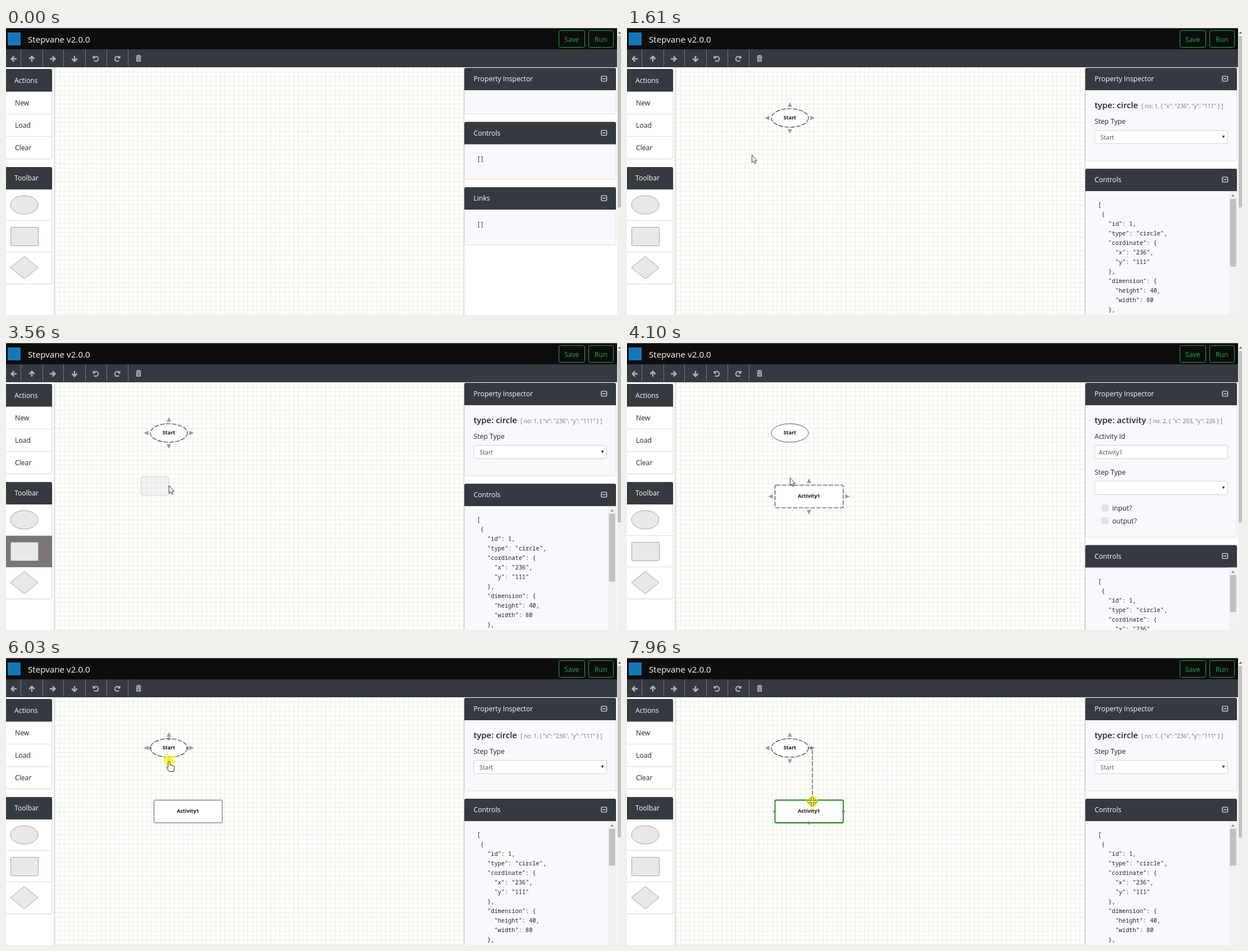
Animation, 1095 px wide and 512 px high, one loop 8 s. Source, as an HTML page:

```html
<!DOCTYPE html>
<html lang="en">
<head>
<meta charset="utf-8">
<title>Diagram editor</title>
<style>
html, body { margin: 0; width: 100%; height: 100%; overflow: hidden; background: #fff; }
svg { display: block; width: 1095px; height: 512px; }
text { font: 12.2px "Open Sans", "Noto Sans", sans-serif; fill: #212529; white-space: pre; }
.head { fill: #343a40; }
.light { fill: #fff; }
.body { fill: #f8f9fc; stroke: #d9dcdf; }
.card { fill: #fff; stroke: #cfd2d5; }
.rule { stroke: #dcdfe1; }
.field { fill: #fff; stroke: #ced4da; }
.value { font-size: 10.9px; fill: #495057; }
.kind { font-size: 14.9px; font-weight: 600; }
.info { font-size: 10px; font-weight: 500; fill: #6c757d; }
.code { font: 10.3px "Noto Sans Mono", "DejaVu Sans Mono", monospace; }
.label { font-size: 9px; font-weight: 700; text-anchor: middle; fill: #111; }
.tool { fill: #e8e8e8; stroke: #a3a3a3; }
.icon { fill: none; stroke: #b0b3b6; stroke-width: 2.5; }
.button { fill: none; stroke: #28a745; }
.green { fill: #28a745; }
.box { fill: none; stroke: #fff; stroke-width: 1.2; }
.grip { fill: #9a9a9a; }
.dot { fill: #848484; }
.shape { fill: #fff; stroke: #555; stroke-width: 1; }
.sel .shape { stroke: #333; stroke-width: 1.15; stroke-dasharray: 8 2.4; }
.hot:not(.sel) .shape { stroke: #128212; stroke-width: 1.8; }
.node .grip, .node .dot { display: none; }
.sel .grip, .hot .dot { display: inline; }
</style>
</head>
<body>
<svg viewBox="0 0 1095 512">
  <defs>
    <pattern id="grid" x="87" y="70" width="8.17" height="8.17" patternUnits="userSpaceOnUse">
      <path d="M.5 0V8.17M0 .5H8.17" stroke="#e7eedd"/>
    </pattern>
    <ellipse id="tool0" class="tool" cx="32.5" cy="315.5" rx="24.5" ry="16.5"/>
    <rect id="tool1" class="tool" x="8.5" y="355.5" width="49" height="33" rx="2"/>
    <path id="tool2" class="tool" d="M32.5 407.5L57 427.5 32.5 447.5 8 427.5Z"/>
    <path id="arrow" class="icon" d="M5 0H-4M.3 -4.7L-4.4 0 .3 4.7"/>
    <path id="turn" class="icon" style="stroke-width:2" d="M-3.6 -2.4A4.3 4.3 0 1 1 -3.2 3M-4.6 -5V-1.4H-1"/>
    <g id="fold"><rect class="box" x="1060" y="-4.5" width="9.5" height="9" rx="1.5"/><path class="box" d="M1062 0H1067.5"/></g>
    <clipPath id="codeClip"><rect x="816" y="40" width="256" height="400"/></clipPath>
  </defs>

  <rect width="1095" height="512" fill="#fff"/>
  <rect x="86" y="70" width="729" height="442" fill="url(#grid)"/>
  <path d="M86 70V512M815.5 70V512" stroke="#d3dade" stroke-width="1.5"/>

  <rect width="1088" height="38" fill="#0d0d0d"/>
  <path d="M0 .5H1088" stroke="#5a5a5a"/>
  <rect class="head" y="38" width="1088" height="32"/>
  <rect x="3" y="8" width="23" height="23" fill="#1478b8"/>
  <text class="light" x="39" y="25.5" style="font-size:15.2px">Stepvane v2.0.0</text>
  <rect class="button" x="984.5" y="4.5" width="46" height="30" rx="3"/>
  <rect class="button" x="1037.5" y="4.5" width="44" height="30" rx="3"/>
  <text class="green" x="994" y="24.5">Save</text>
  <text class="green" x="1048" y="24.5">Run</text>
  <path d="M26.5 38V69M65.5 38V69M102.5 38V69M141.5 38V69M179.5 38V69M217.5 38V69" stroke="#747a80"/>
  <use href="#arrow" transform="translate(14 55)"/>
  <use href="#arrow" transform="translate(46 55) rotate(90)"/>
  <use href="#arrow" transform="translate(83 55) rotate(180)"/>
  <use href="#arrow" transform="translate(122 55) rotate(270)"/>
  <use href="#turn" transform="translate(160 55)"/>
  <use href="#turn" transform="translate(198 55) scale(-1 1)"/>
  <path d="M231 50.5H241M234 50V49H238V50" fill="none" stroke="#b0b3b6" stroke-width="1.4"/>
  <path d="M232 52H240V60H232Z" fill="#b0b3b6"/>
  <path d="M234.4 53.5V58.5M236 53.5V58.5M237.6 53.5V58.5" stroke="#343a40" stroke-width=".7"/>

  <rect class="card" x="-2" y="73.5" width="84" height="160" rx="3"/>
  <path class="head" d="M0 73H79Q82 73 82 76V113.5H0Z"/>
  <path class="rule" d="M0 153.5H81.5M0 193.5H81.5"/>
  <text class="light" x="15" y="98">Actions</text>
  <text x="16" y="138">New</text>
  <text x="16" y="178">Load</text>
  <text x="16" y="218">Clear</text>
  <rect class="card" x="-2" y="248.5" width="84" height="208" rx="3"/>
  <path class="head" d="M0 248H79Q82 248 82 251V288H0Z"/>
  <text class="light" x="15" y="272">Toolbar</text>
  <path class="rule" d="M0 343.5H81.5M0 399.5H81.5"/>
  <rect id="row" width="82" height="56" fill="#7b7675"/>
  <use href="#tool0"/><use href="#tool1"/><use href="#tool2"/>

  <g id="side"></g>
  <rect x="1088" width="7" height="512" fill="#f1f1f1"/>
  <rect x="1089" y="14" width="6" height="306" fill="#c1c1c1"/>
  <path d="M1089.5 10L1092.5 6.5 1095 10Z" fill="#606060"/>

  <g id="circle" class="node">
    <ellipse class="shape" cx="290" cy="160.5" rx="33" ry="16.5"/>
    <text class="label" x="290" y="163">Start</text>
  </g>
  <g id="activity" class="node">
    <rect class="shape" x="263.5" y="253.5" width="121.5" height="40.5" rx="2"/>
    <text class="label" x="324" y="276">Activity1</text>
  </g>
  <path id="link" fill="none" stroke="#444" stroke-width="1.2" stroke-dasharray="8 2.4"/>
  <use id="ghost" opacity=".5"/>
  <g id="cursor">
    <circle id="glow" r="10" fill="#ffff1e" opacity=".8"/>
    <path id="point" fill="#fff" stroke="#222" stroke-width=".9" d="M.5 .5V14.2L3.4 11.4 5.5 16 7.5 15.1 5.5 10.6H9.6Z"/>
    <path id="hand" fill="#fff" stroke="#222" d="M-1.8 2.5Q0 .2 1.6 2.5V8L8 9.5Q9.7 10 9.3 12.5L8 19.5H0L-4.6 13Q-4.6 10 -1.8 12Z"/>
    <path id="move" fill="#fff" fill-opacity=".35" stroke="#55500f" stroke-width=".9"
      d="M0 -9L3.6 -5.4H1.6V-1.6H5.4V-3.6L9 0 5.4 3.6V1.6H1.6V5.4H3.6L0 9 -3.6 5.4H-1.6V1.6H-5.4V3.6L-9 0 -5.4 -3.6V-1.6H-1.6V-5.4H-3.6Z"/>
  </g>
</svg>
<script>
const $ = id => document.getElementById(id);
const show = (el, on) => { el.style.display = on ? '' : 'none'; };
const text = (x, y, s, cls = '') => `<text class="${cls}" x="${x}" y="${y}">${s}</text>`;

// Small triangles around a node, and the connection dots on its outline.
function decorate(id, cx, cy, rx, ry) {
  let out = '';
  [0, 90, 180, 270].forEach(a => {
    const c = Math.round(Math.cos(a * Math.PI / 180)), s = Math.round(Math.sin(a * Math.PI / 180));
    out += `<path class="grip" transform="translate(${cx + c * (rx + 7.5)} ${cy + s * (ry + 7.5)}) rotate(${a})" d="M-4 -4L4 0 -4 4Z"/>`;
    out += `<circle class="dot" cx="${cx + c * rx}" cy="${cy + s * ry}" r="2.5"/>`;
  });
  $(id).insertAdjacentHTML('beforeend', out);
}
decorate('circle', 290, 160.5, 33, 16.5);
decorate('activity', 324, 273.7, 61, 20.5);

function card(title, top, bottom) {
  return `<rect class="body" x="816.5" y="${top + .5}" width="269.5" height="${bottom - top - 1}" rx="3"/>
    <path class="head" d="M816 ${top + 40}V${top + 3}Q816 ${top} 819 ${top}H1083Q1086 ${top} 1086 ${top + 3}V${top + 40}Z"/>
    <use href="#fold" y="${top + 19.5}"/>` + text(832.5, top + 24.3, title, 'light');
}
const field = (y, s, x) => `<rect class="field" x="833" y="${y + .5}" width="236.5" height="24" rx="2.5"/>` + text(x, y + 17, s, 'value');
const select = (y, s) => field(y, s, 843) + `<path d="M1059.5 ${y + 10}H1064.5L1062 ${y + 14.5}Z" fill="#333"/>`;
const check = (y, s) => `<rect x="845" y="${y - 6}" width="12.5" height="12.5" rx="2.5" fill="#dee2e6"/>` + text(864, y + 4.5, s);
const heading = (kind, x, info) => text(832.5, 143.3, 'type: ' + kind, 'kind') + text(x, 143.3, info, 'info');

const json = ['[', ' {', '   "id": 1,', '   "type": "circle",', '   "cordinate": {', '     "x": "236",', '     "y": "111"',
  '   },', '   "dimension": {', '     "height": 40,', '     "width": 80', '   },'];
const controls = top => `<g transform="translate(0 ${top})">` + card('Controls', 0, 400) +
  '<g clip-path="url(#codeClip)">' + json.map((s, i) => text(838.5, 68.4 + i * 16.95, s, 'code')).join('') + `</g>
  <rect x="1072" y="40" width="13.5" height="400" fill="#f1f1f1"/>
  <path d="M1076 49.5L1079 46 1082 49.5Z" fill="#808080"/>
  <rect class="thumb" x="1073.5" y="53.5" width="11" height="66" fill="#c1c1c1"/></g>`;

const views = {
  none: card('Property Inspector', 71, 154) + card('Controls', 167.5, 270.5) + text(838.5, 237, '[]', 'code') +
    card('Links', 284, 387.5) + text(838.5, 353.5, '[]', 'code'),
  circle: card('Property Inspector', 71, 237.5) + heading('circle', 916, '[ no: 1, { "x": "236", "y": "111" } ]') +
    text(832.5, 171, 'Step Type') + select(182, 'Start') + controls(251),
  activity: card('Property Inspector', 71, 347) + heading('activity', 930.5, '[ no: 2, { "x": 203, "y": 226 } ]') +
    text(832.5, 171, 'Activity Id') + field(182, 'Activity1', 840) + text(832.5, 235, 'Step Type') + select(246, '') +
    check(294, 'input?') + check(317, 'output?') + controls(360.5)
};
$('side').innerHTML = Object.keys(views).map(k => `<g id="view-${k}">${views[k]}</g>`).join('');
const thumb = document.querySelector('#view-circle .thumb');

// Pointer track: time, x, y
const track = [
  [120, 850, 268], [430, 250, 420], [500, 60, 432], [600, 50, 345], [670, 45, 318], [840, 45, 318],
  [1180, 284, 131], [1290, 284, 131], [1540, 222, 226], [1700, 222, 226], [1850, 199, 262], [2050, 300, 168],
  [2250, 905, 200], [2480, 600, 190], [2700, 430, 134], [3000, 58, 371], [3110, 58, 371], [3330, 244, 295],
  [3560, 290, 254], [3710, 290, 254], [3790, 290, 240], [4180, 290, 240], [4800, 292, 178], [4930, 293, 172],
  [5640, 292, 173], [6010, 290.5, 183], [6110, 290.5, 183], [6490, 300, 236], [6800, 340, 272],
  [7340, 331, 256], [8001, 330, 256]
];
function pointer(t) {
  const i = track.findIndex(k => k[0] > t);
  if (i < 1) return null;
  const [a, b] = [track[i - 1], track[i]], p = (t - a[0]) / (b[0] - a[0]);
  return [a[1] + (b[1] - a[1]) * p, a[2] + (b[2] - a[2]) * p];
}

const LOOP = 8000, STEP = 77.2, LAST = 7960;
function draw(now) {
  const t = LAST - Math.ceil((LAST - now % LOOP) / STEP - .001) * STEP;
  const at = pointer(t), [x, y] = at || [-99, -99];
  const sel = t < 1285 ? 'none' : t >= 4015 && t < 5020 ? 'activity' : 'circle';
  const linking = t >= 6110;
  const drag = t >= 840 && t < 1285 ? 0 : t >= 3110 && t < 4015 ? 1 : -1;
  const overTool = x > 0 && x < 82 && y >= 288 && y < 456;
  const overCircle = sel !== 'none' && drag < 0 && Math.abs(x - 290) < 33 && Math.abs(y - 160) < 25;
  const overActivity = t >= 4015 && x > 263 && x < 385 && y > 252 && y < 295;

  for (const k in views) show($('view-' + k), k === sel);
  thumb.setAttribute('height', t < 4015 ? 121 : 66);

  const row = drag >= 0 ? drag : overTool ? Math.floor((y - 288) / 56) : -1;
  show($('row'), row >= 0);
  $('row').setAttribute('y', 288 + row * 56);

  show($('circle'), sel !== 'none');
  show($('activity'), t >= 4015);
  for (const [id, hot] of [['circle', overCircle], ['activity', overActivity]]) {
    $(id).classList.toggle('sel', sel === id);
    $(id).classList.toggle('hot', hot);
  }

  show($('link'), linking);
  $('link').setAttribute('d', x > 323 ? `M323 160.5H${x}V${y - 8}` : `M290 177V${(169 + y) / 2}H${x}V${y - 8}`);

  show($('ghost'), drag >= 0);
  if (drag >= 0) {
    $('ghost').setAttribute('href', '#tool' + drag);
    const [gx, gy] = drag ? [58, 371] : [45, 318];
    $('ghost').setAttribute('transform', `translate(${x - gx} ${y - gy})`);
  }

  const kind = linking || overCircle && y < 180 || overActivity ? 'move'
    : drag < 0 && (overTool || overCircle) ? 'hand' : 'point';
  for (const k of ['point', 'hand', 'move']) show($(k), k === kind);
  show($('cursor'), at);
  show($('glow'), t >= 4900 && t < 5100 || t >= 6000);
  $('cursor').setAttribute('transform', `translate(${x} ${y})`);
}

const start = performance.now();
function tick() {
  draw(performance.now() - start);
  requestAnimationFrame(tick);
}
tick();
</script>
</body>
</html>
```
